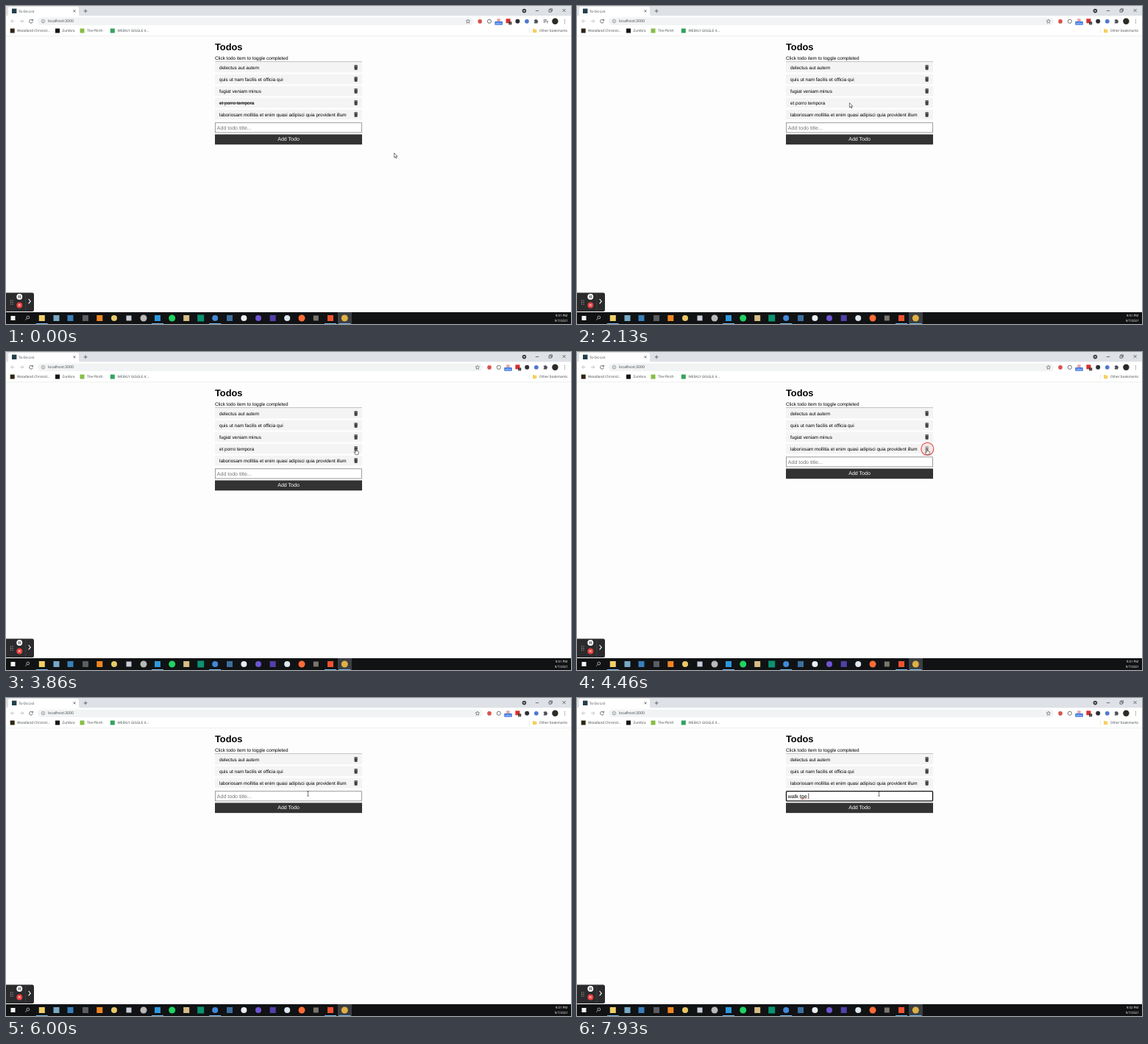
An HTML page that plays this animation: 768x432 px, repeating every 8000 ms.

```html
<!DOCTYPE html>
<html lang="en">
<head>
<meta charset="utf-8">
<title>Todos</title>
<style>
  html, body { margin: 0; width: 100%; height: 100%; overflow: hidden; background: #fdfdfd; }
  svg { display: block; width: 768px; height: 432px; }
  text { font: 6.4px "Liberation Sans", Arial, sans-serif; text-rendering: geometricPrecision; white-space: pre; }
  .ui { font: 4.65px "Open Sans", sans-serif; fill: #3c4043; }
  .field { font-size: 7.04px; }
  .line { fill: none; stroke: #4d5156; stroke-width: .8; }
  .done { text-decoration: line-through; }
</style>
</head>
<body>
<svg viewBox="0 0 768 432">
  <defs>
    <g id="trash" fill="#333">
      <path d="M-2.5-3H-1L-.6-3.5H.6L1-3H2.5V-2.2H-2.5Z"/>
      <path d="M-2.2-1.8H2.2L1.9 3Q1.9 3.4 1.4 3.4H-1.4Q-1.9 3.4-1.9 3Z"/>
      <path d="M-.9-1V2.6M0-1V2.6M.9-1V2.6" stroke="#777" stroke-width=".25"/>
    </g>
  </defs>

  <g id="page">
    <text x="284" y="59.7" style="font-size:12.8px;font-weight:bold">Todos</text>
    <text x="284" y="73">Click todo item to toggle completed</text>
    <path d="M284 75.7H484" stroke="#aaa" stroke-width=".8"/>
    <g id="list"></g>
    <g id="form">
      <rect id="box" x="284.5" y=".5" width="199" height="13.2" fill="#fff"/>
      <text id="entry" class="field" x="286.8" y="9.4"></text>
      <path id="squiggle" d="M303 11.3l.8-.8l.8.8l.8-.8l.8.8l.8-.8l.8.8l.8-.8l.8.8l.8-.8l.8.8l.8-.8l.8.8" fill="none" stroke="#e33" stroke-width=".5"/>
      <path id="caret" d="M0 3.2V11" stroke="#000" stroke-width=".6"/>
      <rect x="284" y="16.2" width="200" height="13.8" fill="#333"/>
      <text class="field" x="384" y="25.2" fill="#fff" text-anchor="middle">Add Todo</text>
    </g>
  </g>

  <g id="browser">
    <path d="M0 0H768V13.6H0Z" fill="#dee1e6"/>
    <path d="M0 13.6H768V40.6H0Z" fill="#fff"/>
    <path d="M0 40.8H768" stroke="#dfe1e4" stroke-width=".6"/>
    <path d="M1 13.8Q3 13.6 3 11.5V3.5Q3 1 5.5 1H96.5Q99 1 99 3.5V11.5Q99 13.6 101 13.8Z" fill="#fff"/>
    <rect x="8" y="3.6" width="6.4" height="6.4" fill="#23404a"/>
    <text class="ui" x="17" y="8.5">To-Do List</text>
    <path class="line" d="M91.5 5.3l3 3m0-3l-3 3M105.7 6.8h4.8m-2.4-2.4v4.8M719.8 6.5h4.4M738 5h3.2v3.2H738ZM739.2 5V3.8h3.2V7h-1.2M756.6 4l4 4m0-4l-4 4"/>
    <circle cx="704.4" cy="6.6" r="2.8" fill="#3c4043"/>
    <path d="M703 6h2.8l-1.4 1.6Z" fill="#fff"/>
    <path class="line" style="stroke:#b5b8bc" d="M11.5 20.6H6.7m2.3-2.3l-2.3 2.3l2.3 2.3M19 20.6h4.8m-2.3-2.3l2.3 2.3l-2.3 2.3"/>
    <path class="line" d="M36 19.3A2.4 2.4 0 1 0 36.4 21.4M36.6 17.8v2h-2"/>
    <rect id="address" x="43" y="15.4" height="10.6" rx="5.3" fill="#f1f3f4"/>
    <circle class="line" cx="50.5" cy="20.7" r="2.3" style="stroke-width:.5"/>
    <path d="M50.5 20.3v1.6m0-2.8v.5" stroke="#4d5156" stroke-width=".5"/>
    <text class="ui" x="57" y="22.4" style="font-size:5.2px">localhost:3000</text>
    <g id="extensions"></g>
    <g id="playlist" class="line"><path d="M730.6 18.7h4.4m-4.4 1.8h4.4m-4.4 1.8h2.6m2.6 1.2v-2.8h1.2"/></g>
    <circle cx="746.4" cy="20.8" r="4.2" fill="#2b2a25"/>
    <path d="M759.5 18.3v.9m0 1.3v.9m0 1.3v.9" stroke="#4d5156" stroke-width=".9"/>
    <g id="bookmarks"></g>
    <path d="M711.3 30.5v6.5" stroke="#d0d3d7" stroke-width=".5"/>
    <path d="M716 31h2l.7.8h2.6v4.4H716Z" fill="#f7cf5e"/>
    <text class="ui" x="725" y="35.3">Other bookmarks</text>
  </g>

  <g id="recorder">
    <path d="M0 389.5H35.5Q38 389.5 38 392V412.5Q38 415 35.5 415H0Z" fill="#2b2b2d"/>
    <path d="M26.7 389.5V415" stroke="#4a4a4c" stroke-width=".6"/>
    <path d="M6.4 399.5v6M9 399.5v6" stroke="#ccc" stroke-width="1" stroke-dasharray="1 1.5"/>
    <circle cx="18.3" cy="395" r="4" fill="#fff"/>
    <path d="M17.3 393.2v3.6m2-3.6v3.6" stroke="#222" stroke-width=".9"/>
    <circle cx="18.3" cy="406.4" r="4" fill="#e9413f"/>
    <path d="M17 405.1l2.6 2.6m0-2.6l-2.6 2.6" stroke="#fff" stroke-width=".9"/>
    <path d="M30.6 398l2.7 3.2l-2.7 3.2" fill="none" stroke="#fff" stroke-width="1.1"/>
  </g>

  <g id="taskbar">
    <path d="M0 416H768V432H0Z" fill="#101214"/>
    <path d="M451 416H470V432H451Z" fill="#3b3e42"/>
    <circle cx="29.8" cy="423" r="1.9" fill="none" stroke="#ddd" stroke-width=".7"/>
    <path d="M28.4 424.4l-2.2 2.4" stroke="#ddd" stroke-width=".7"/>
    <g id="apps"></g>
    <text id="clock" class="ui" x="755" y="422.2" text-anchor="middle" style="fill:#fff;font-size:4.4px"></text>
    <text class="ui" x="755" y="429.2" text-anchor="middle" style="fill:#fff;font-size:4.4px">9/7/2021</text>
  </g>

  <circle id="ring" fill="#f3dedd" fill-opacity=".55" stroke="#e8514d" stroke-width="1.2"/>
  <g id="cursor" stroke="#111" stroke-width=".55" stroke-linejoin="round">
    <path id="arrow" d="M0 0V6.3L1.5 5L2.5 7.2L3.5 6.8L2.5 4.6H4.4Z" fill="#fff"/>
    <path id="hand" d="M-.6.6Q0-.3.6.6V3L3 3.6Q3.7 3.9 3.6 4.7L3 8H-.9L-2.6 5.2Q-2.7 4.3-1.8 4.5L-.6 5.4Z" fill="#fff"/>
    <path id="beam" d="M-1.4-3.2H-.4L0-2.9L.4-3.2H1.4M0-2.9V2.9M-1.4 3.2H-.4L0 2.9L.4 3.2H1.4" fill="none"/>
  </g>
</svg>

<script>
const $ = id => document.getElementById(id);
const set = (id, attrs) => { for (const k in attrs) $(id).setAttribute(k, attrs[k]); };
const show = (id, on) => set(id, { visibility: on ? 'visible' : 'hidden' });
const square = (x, y, size, color) =>
  `<rect x="${x - size / 2}" y="${y - size / 2}" width="${size}" height="${size}" fill="${color}"/>`;
const dot = (x, y, size, color) => `<circle cx="${x}" cy="${y}" r="${size / 2}" fill="${color}"/>`;

const LOOP = 8000, TOGGLE = 1070, DELETE_A = 4330, DELETE_B = 5130, FOCUS = 6080, TYPING = 7130;
const CLICKS = [TOGGLE, DELETE_A, DELETE_B, FOCUS];
const TYPED = 'walk tge ';
const TODOS = ['delectus aut autem', 'quis ut nam facilis et officia qui', 'fugiat veniam minus',
  'et porro tempora', 'laboriosam mollitia et enim quasi adipisci quia provident illum'];
// time, x, y of the pointer
const PATH = [[0, 527.7, 199.7], [930, 364.3, 157], [1050, 335, 131], [1660, 335, 131], [2500, 395, 132],
  [3200, 472, 128.8], [3350, 475.8, 131.3], [4600, 475.8, 131.3], [4950, 474.9, 115.6],
  [5550, 474.9, 115.6], [6000, 410.5, 130], [8000, 410.5, 130]];

$('bookmarks').innerHTML = [[8.7, 15, '#2c2611', 'Woodland Chronicl...'], [70, 76.5, '#151515', 'Zumbra'],
  [103.5, 110, '#86bd45', 'The Plinth'], [144.8, 151.5, '#32a35c', 'WEEKLY GIGGLE 4...']]
  .map(([icon, x, color, name]) => square(icon, 33.6, 6, color) + `<text class="ui" x="${x}" y="35.3">${name}</text>`).join('');

$('extensions').innerHTML =
  '<path class="line" style="stroke-width:.6" d="M628 18l.8 1.8l2 .2l-1.5 1.3l.4 2l-1.7-1l-1.7 1l.4-2l-1.5-1.3l2-.2Z"/>' +
  dot(644.2, 20.9, 5.6, '#d8524b') +
  '<circle class="line" cx="657" cy="20.8" r="2.6"/>' +
  square(669.6, 19.5, 4.5, '#e4a7a0') + '<rect x="664.4" y="21" width="10.6" height="4.8" rx=".8" fill="#3974e3"/>' +
  '<text x="669.7" y="24.7" text-anchor="middle" fill="#fff" style="font-size:3.6px">NEW</text>' +
  square(682.6, 20.3, 6, '#d92f2c') + square(685.4, 23.4, 4, '#333') +
  '<text x="685.4" y="24.8" text-anchor="middle" fill="#fff" style="font-size:3.6px">1</text>' +
  dot(695.4, 20.8, 6, '#2d3033') + dot(708, 20.8, 5.8, '#4c78cf') +
  '<path d="M718 18.8h1.4a.9.9 0 0 1 1.8 0h1.3v1.4a.9.9 0 0 1 0 1.8v1.5H718v-1.6a.8.8 0 0 0 0-1.6Z" fill="#4d5156"/>';

const APPS = [[9.5, '#f4f4f4', 6], [48.8, '#f1cf68', 8], [68.5, '#78a9c6', 8], [87.5, '#397fb9', 8],
  [108, '#5b5e61', 8], [127.3, '#f08522', 8], [147, '#e8c866', 8, 1], [167, '#c8cdd8', 7],
  [187, '#b9b9b9', 9, 1], [206, '#2c98dc', 8], [225.7, '#1fd362', 9, 1], [245.2, '#d7bd83', 8],
  [264.7, '#0b9270', 9], [284.2, '#4289d8', 8, 1], [304, '#3b6f9f', 8], [323.4, '#e9eef4', 8, 1],
  [343, '#6e55d2', 8, 1], [362.7, '#5140a8', 8], [382.2, '#dce7f0', 8, 1], [402, '#ff6c37', 9, 1],
  [421.3, '#7b766d', 7], [441, '#ee5330', 8], [460.3, '#dfb044', 9, 1]];
$('apps').innerHTML = APPS.map(([x, color, size, round]) => (round ? dot : square)(x, 424, size, color)).join('') +
  [48.8, 206, 284.2, 441, 460.3].map(x => `<path d="M${x - 8} 431.5h16" stroke="#76b9ed"/>`).join('');

function drawList(todos, struck) {
  const key = todos.length + ':' + struck;
  if (drawList.key === key) return;
  drawList.key = key;
  $('list').innerHTML = todos.map((todo, i) => {
    const y = 83.4 + 16 * i;
    return `<rect x="284" y="${y - 6.5}" width="200" height="13.2" fill="#f4f4f4"/>
      <text x="290" y="${y + 2.2}" class="${struck && todo === TODOS[3] ? 'done' : ''}">${todo}</text>
      <use href="#trash" x="475.6" y="${y}"/>`;
  }).join('');
  set('form', { transform: `translate(0 ${78.2 + 16 * todos.length})` });
}

function pointerAt(t) {
  const i = PATH.findIndex(p => p[0] > t);
  const [t0, x0, y0] = PATH[i - 1], [t1, x1, y1] = PATH[i];
  const u = (t - t0) / (t1 - t0), e = u * u * (3 - 2 * u);
  return [x0 + (x1 - x0) * e, y0 + (y1 - y0) * e];
}

function render(t) {
  const todos = TODOS.filter((_, i) => !(i === 3 && t >= DELETE_A + 60) && !(i === 2 && t >= DELETE_B + 60));
  drawList(todos, t < TOGGLE + 60);

  const focused = t >= FOCUS;
  const typed = t < TYPING ? '' : TYPED.slice(0, 1 + Math.floor((t - TYPING) / 92));
  set('box', { stroke: focused ? '#101010' : '#858585', 'stroke-width': focused ? 1.3 : .8, rx: focused ? 1 : 0 });
  $('entry').textContent = typed || 'Add todo title...';
  set('entry', { fill: typed ? '#000' : '#757575' });
  set('caret', { transform: `translate(${287 + (typed ? $('entry').getComputedTextLength() : 0)} 0)` });
  show('caret', focused && t < 6600 || t >= TYPING);
  show('squiggle', typed === TYPED);
  $('clock').textContent = t < TYPING ? '9:01 PM' : '9:02 PM';

  const compact = t >= 1660;
  set('address', { width: compact ? 605 : 592.5 });
  set('extensions', { transform: `translate(${compact ? 12.8 : 0} 0)` });
  show('playlist', !compact);

  const [x, y] = pointerAt(t);
  const shape = t >= 5930 ? 'beam' : t >= 3250 && t < 5640 ? 'hand' : 'arrow';
  for (const id of ['arrow', 'hand', 'beam']) show(id, id === shape);
  set('cursor', { transform: `translate(${x} ${y})` });

  const age = t - CLICKS.findLast(c => c <= t);
  show('ring', age < 330);
  if (age < 330) set('ring', { cx: x + .5, cy: y + .4, r: 4.3 + .032 * age, opacity: Math.min(1, (380 - age) / 130) });
}

function tick() {
  render(performance.now() % LOOP);
  requestAnimationFrame(tick);
}
tick();
</script>
</body>
</html>
```
